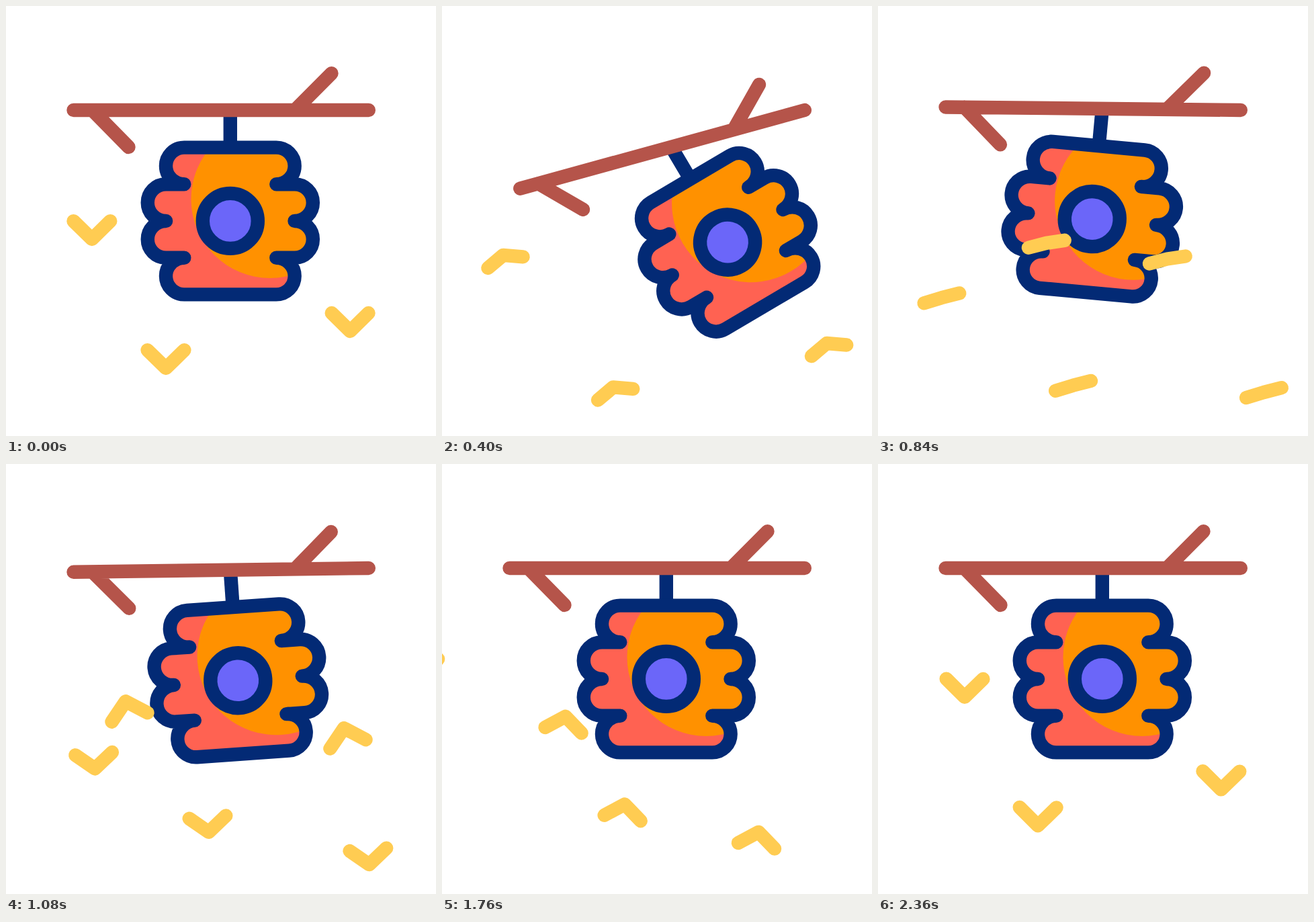
Recreate the animation shown at these times as an HTML page. Size 640 by 640 pixels, loop 2.4 s.

```html
<!DOCTYPE html>
<html lang="en">
<head>
<meta charset="utf-8">
<title>Beehive</title>
<style>
  html, body { margin: 0; height: 100%; overflow: hidden; background: #fff; }
  svg { display: block; width: 100vw; height: 100vh; }
  path, circle { stroke-width: 20.4; stroke-linecap: round; stroke-linejoin: round; }
</style>
</head>
<body>
<svg viewBox="0 0 640 640">
  <defs>
    <path id="shape"/>
    <clipPath id="inside"><use href="#shape"/></clipPath>
  </defs>
  <g id="branch">
    <g id="hive" stroke="#032a75">
      <path d="M333.8 155V210" style="stroke-linecap:butt"/>
      <use href="#shape" fill="#ff6252" stroke="none"/>
      <g clip-path="url(#inside)"><circle cx="393" cy="287.5" r="117.5" fill="#ff9100" stroke="none"/></g>
      <use href="#shape" fill="none"/>
      <circle cx="333.8" cy="319.9" r="41" fill="#6b66f9"/>
    </g>
    <path d="M100.5 155H539.8M128.5 155L182.5 210M484.5 100.3L430 155" fill="none" stroke="#b5544a"/>
  </g>
  <g id="bees" fill="none" stroke="#ffcc52"></g>
</svg>
<script>
const LOOP = 2400, LAP = 2370, HATCH = 543, FLAP = 1130;
const { sin, cos, exp, abs, min, PI } = Math;
const get = id => document.getElementById(id);

// Four lobes down the right side, four up the left
const side = dir => {
  const lobe = `a27.35 27.35 0 0 1 0 ${54.7 * dir}`;
  return `${lobe}h${27.2 * dir}${lobe}${lobe}h${-27.2 * dir}${lobe}`;
};
get("shape").setAttribute("d", `M265.3 210.6h137${side(1)}h-137${side(-1)}z`);

// Each swing goes the other way, half as far and a little quicker
function swing(t, stretch) {
  let from = 0, to = -15.4;
  for (let i = 0; i < 5; i++) {
    const span = stretch * (245 + 155 * 0.3 ** i), u = t / span;
    if (u < 1) return from + (to - from) * u * u * (3 - 2 * u);
    t -= span;
    from = to;
    to = i < 3 ? -to / 2 : 0;
  }
  return 0;
}

// Circles once around a centre given relative to home
const circler = (x, y, cx, cy, turn, lag, lead) => t => {
  const a = 2 * PI * min(t / LAP, 1);
  const angle = turn * (a - lag * sin(a) + lead * (1 - cos(a)));
  return {
    x: x + cx - cx * cos(angle) + cy * sin(angle),
    y: y + cy - cx * sin(angle) - cy * cos(angle),
    tilt: -sin(a) * (15 + 6 * sin(a)),
    age: t
  };
};

// Leaves the hive sideways on a wave
const leaver = (dir, height, period) => t => {
  const age = t - HATCH;
  return {
    x: 340.5 + dir * 0.302 * age,
    y: 335 + height * sin(2 * PI * age / period),
    tilt: -15.5 * (1 - exp(-age / 220)),
    age
  };
};

const bees = [
  circler(128, 347, 8, 53, -1, 0.29, 0.07),
  circler(238, 539, 32.5, 0, -1, 0, 0),
  circler(512, 484, 16.5, 55.5, 1, 0, 0.18),
  leaver(-1, 20, 1700),
  leaver(1, 59, 2400)
].map(fly => {
  const node = document.createElementNS("http://www.w3.org/2000/svg", "path");
  get("bees").append(node);
  return { fly, node };
});

function drawBee({ fly, node }, t) {
  const { x, y, tilt, age } = fly(t);
  node.style.display = age < 0 ? "none" : "";
  const phase = min(abs(age) / FLAP, 2) % 1;
  const wing = 27 - 54 * abs(1 - 2 * phase);
  node.setAttribute("d", `M-27.4 ${wing}L0 0L27.4 ${wing}`);
  node.setAttribute("transform", `translate(${x} ${y}) rotate(${tilt})`);
}

function draw(now) {
  const t = now % LOOP;
  get("branch").setAttribute("transform", `rotate(${swing(t, 1)} 539.8 155)`);
  get("hive").setAttribute("transform", `rotate(${swing(t, 1.08)} 333.8 155)`);
  bees.forEach(bee => drawBee(bee, t));
  requestAnimationFrame(draw);
}
draw(0);
</script>
</body>
</html>
```
